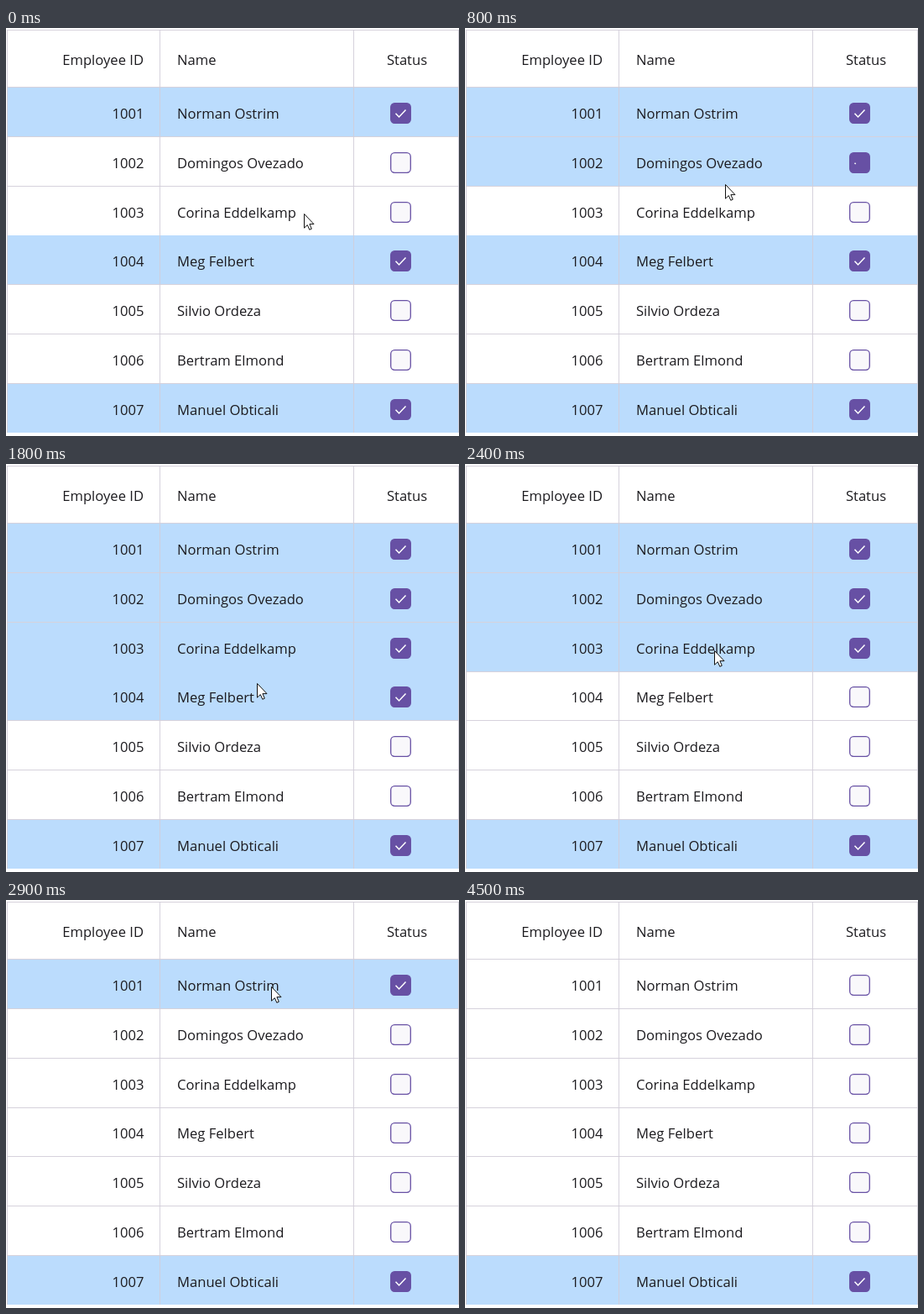
An HTML page that plays this animation: 540x486 px, repeating every 4600 ms.

```html
<!DOCTYPE html>
<html lang="en">
<head>
<meta charset="utf-8">
<title>Employee grid</title>
<style>
  html, body { margin: 0; width: 100%; height: 100%; overflow: hidden; background: #fff; }
  svg { display: block; width: 540px; height: 486px; }
  text { font: 16.6px "Open Sans", "Noto Sans", sans-serif; fill: #1c1b1f; }
  .end { text-anchor: end; }
  .mid { text-anchor: middle; }
  .fill { fill: #bbdcfd; }
  .line { fill: #d2ced9; fill-opacity: .9; }
  .box { stroke: #6750a4; stroke-width: 1.3; }
  .tick { fill: none; stroke: #fff; stroke-width: 1.5; }
</style>
</head>
<body>
<svg id="stage" viewBox="0 0 540 486"></svg>
<script>
const LOOP = 4600, STEP = 100, TICK_TIME = 300;
const stage = document.getElementById("stage");

// Each row: name, selected at start, times at which a click toggles it
const rows = [
  ["Norman Ostrim", true, [3200]],
  ["Domingos Ovezado", false, [800, 2700]],
  ["Corina Eddelkamp", false, [1300, 2500]],
  ["Meg Felbert", true, [1900]],
  ["Silvio Ordeza", false, []],
  ["Bertram Elmond", false, []],
  ["Manuel Obticali", true, []]
].map(([name, on, clicks], i) => ({ name, on, clicks, y: 71 + 59 * i - (i > 2 ? 1 : 0) }));

// Pointer stops: time, x, y
const path = [
  [0, 355, 221], [600, 310, 186], [900, 310, 186], [1200, 304, 222],
  [1400, 304, 222], [1700, 299, 261], [1900, 299, 261], [2300, 297, 222],
  [2500, 297, 222], [2700, 303, 160], [2900, 316, 103], [3200, 317, 98],
  [3300, 317, 98], [3600, 335, -25]
];

function add(tag, attrs, content) {
  const el = document.createElementNS("http://www.w3.org/2000/svg", tag);
  for (const key in attrs) el.setAttribute(key, attrs[key]);
  if (content) el.textContent = content;
  stage.appendChild(el);
  return el;
}

const label = (x, y, content, cls = "") => add("text", { x, y, class: cls }, content);
const rect = (x, y, width, height, cls) => add("rect", { x, y, width, height, class: cls });

rect(1, 2, 539, 1, "line");
rect(1, 70, 539, 1, "line");
rows.forEach((row, i) => {
  row.fill = rect(1, row.y, 539, 58, "fill");
  if (i < rows.length - 1) rect(1, row.y + 58, 539, 1, "line");
});
for (const x of [1, 183, 414, 539]) rect(x, 2, 1, 480, "line");

label(164, 44, "Employee ID", "end");
label(204, 44, "Name");
label(478, 44, "Status", "mid");

rows.forEach((row, i) => {
  const mid = row.y + 30.5;
  label(164.5, row.y + 37, 1001 + i, "end");
  label(204, row.y + 37, row.name);
  row.box = add("rect", { x: 458.7, y: mid - 11.8, width: 23.6, height: 23.6, rx: 4.5, class: "box" });
  row.tick = add("path", {
    d: `M464.5 ${mid + .3}l4 4.2 8-8.4`, pathLength: 1, class: "tick"
  });
});

const pointer = add("path", {
  d: "M.5.5V17.2L4.3 13.6 6.8 19.3 9.3 18.2 6.9 12.6H12Z",
  fill: "#fff", stroke: "#111", "stroke-width": 1
});

const ease = p => p * p * (3 - 2 * p);

function pointerAt(t) {
  const i = path.findIndex(stop => stop[0] > t);
  if (i < 0) return null;
  const [t0, x0, y0] = path[i - 1], [t1, x1, y1] = path[i];
  const p = ease((t - t0) / (t1 - t0));
  return [x0 + (x1 - x0) * p, y0 + (y1 - y0) * p];
}

function draw(t) {
  for (const row of rows) {
    const past = row.clicks.filter(click => click <= t);
    const on = row.on !== (past.length % 2 === 1);
    const age = past.length ? t - past[past.length - 1] : LOOP;
    const grown = Math.min(1, .1 + age / TICK_TIME);
    row.fill.style.display = row.tick.style.display = on ? "" : "none";
    row.box.setAttribute("fill", on ? "#6750a4" : "#f9f8fb");
    row.tick.setAttribute("stroke-dasharray", grown < 1 ? `${grown} 2` : "none");
  }
  const at = pointerAt(t);
  pointer.style.display = at ? "" : "none";
  if (at) pointer.setAttribute("transform", `translate(${at.map(Math.round)})`);
}

function frame() {
  const t = performance.now() % LOOP;
  draw(Math.floor(t / STEP) * STEP);
  requestAnimationFrame(frame);
}
frame();
</script>
</body>
</html>
```
